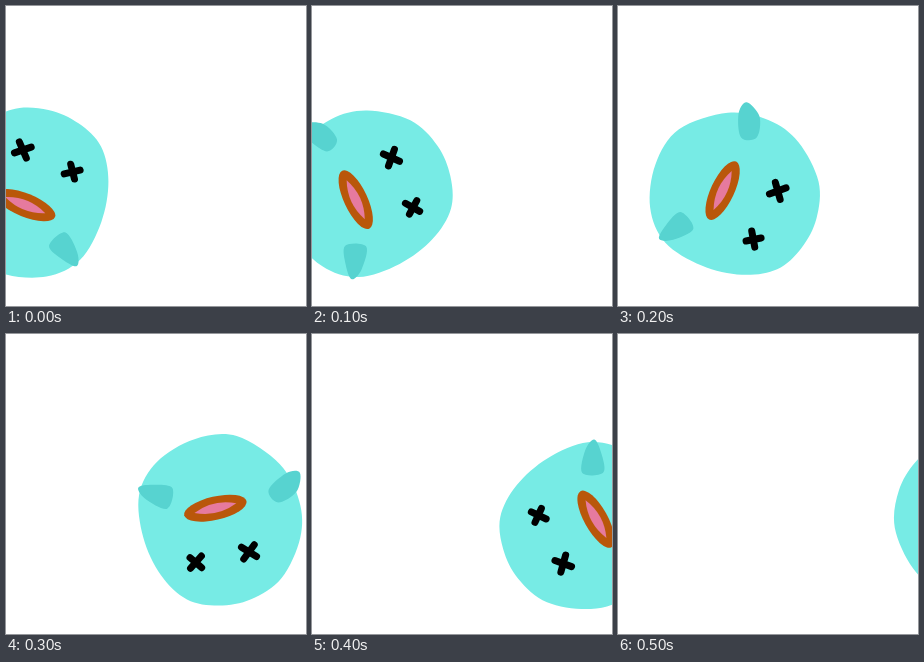
Animation of 300 by 300 pixels, one loop 0.6 s. Source, as an HTML page:

```html
<!DOCTYPE html>
<html lang="en">
<head>
<meta charset="utf-8">
<title>Rolling blob</title>
<style>
  html, body { margin: 0; height: 100%; overflow: hidden; background: #fff; }
  svg { display: block; width: 100%; height: 100%; }
</style>
</head>
<body>
<svg viewBox="0 0 300 300">
  <g id="blob">
    <path id="body" fill="#77ebe5"/>
    <path id="left" fill="#57d3d0"/>
    <path id="right" fill="#57d3d0"/>
    <g transform="translate(-2.3 49.3) rotate(-2)">
      <ellipse rx="32" ry="11.7" fill="#b9570a"/>
      <path d="M-21.5 0Q0-9.5 21.5 0Q0 9.5-21.5 0" fill="#e67a9e"/>
    </g>
    <path d="M-33.5-6l13 12m0-12l-13 12M22.5-6.5l9.5 12m1.5-10.5l-13 10"
          fill="none" stroke="#000" stroke-width="7" stroke-linecap="round"/>
  </g>
</svg>
<script>
const $ = id => document.getElementById(id);

// Closed Catmull-Rom curve through a few key points
function curve(id, ...pts) {
  const n = pts.length;
  const p = i => pts[(i + n) % n];
  const handle = (at, from, to) => at.map((v, k) => v + (to[k] - from[k]) / 6);
  let d = `M${p(0)}`;
  for (let i = 0; i < n; i++) {
    const a = handle(p(i), p(i - 1), p(i + 1));
    const b = handle(p(i + 1), p(i + 2), p(i));
    d += `C${a} ${b} ${p(i + 1)}`;
  }
  $(id).setAttribute("d", d + "Z");
}

// The origin lies midway between the eyes
curve("body", [-20, -47], [13, -47], [43, -35], [64, -6], [74, 34], [70, 77],
  [46, 106], [5, 121], [-37, 116], [-74, 80], [-86, 40], [-80, 4], [-54, -32]);
curve("left", [-58, 57], [-65, 43], [-85, 50], [-92, 68], [-78, 70]);
curve("right", [36, 77], [45, 58], [64, 71], [69.5, 84], [54, 84]);

// x, y, angle of each pose
const poses = [
  [41.5, 155, 24], [90, 176.5, 67], [147.5, 209, 117],
  [216.5, 223, 169], [239, 205.5, 243], [331.5, 163, 300]
];
const hold = 100;
const start = performance.now();

function draw(now) {
  const step = Math.floor(Math.max(0, now - start) / hold);
  const [x, y, angle] = poses[step % poses.length];
  $("blob").setAttribute("transform", `translate(${x} ${y}) rotate(${angle})`);
  requestAnimationFrame(draw);
}
draw(start);
</script>
</body>
</html>
```
